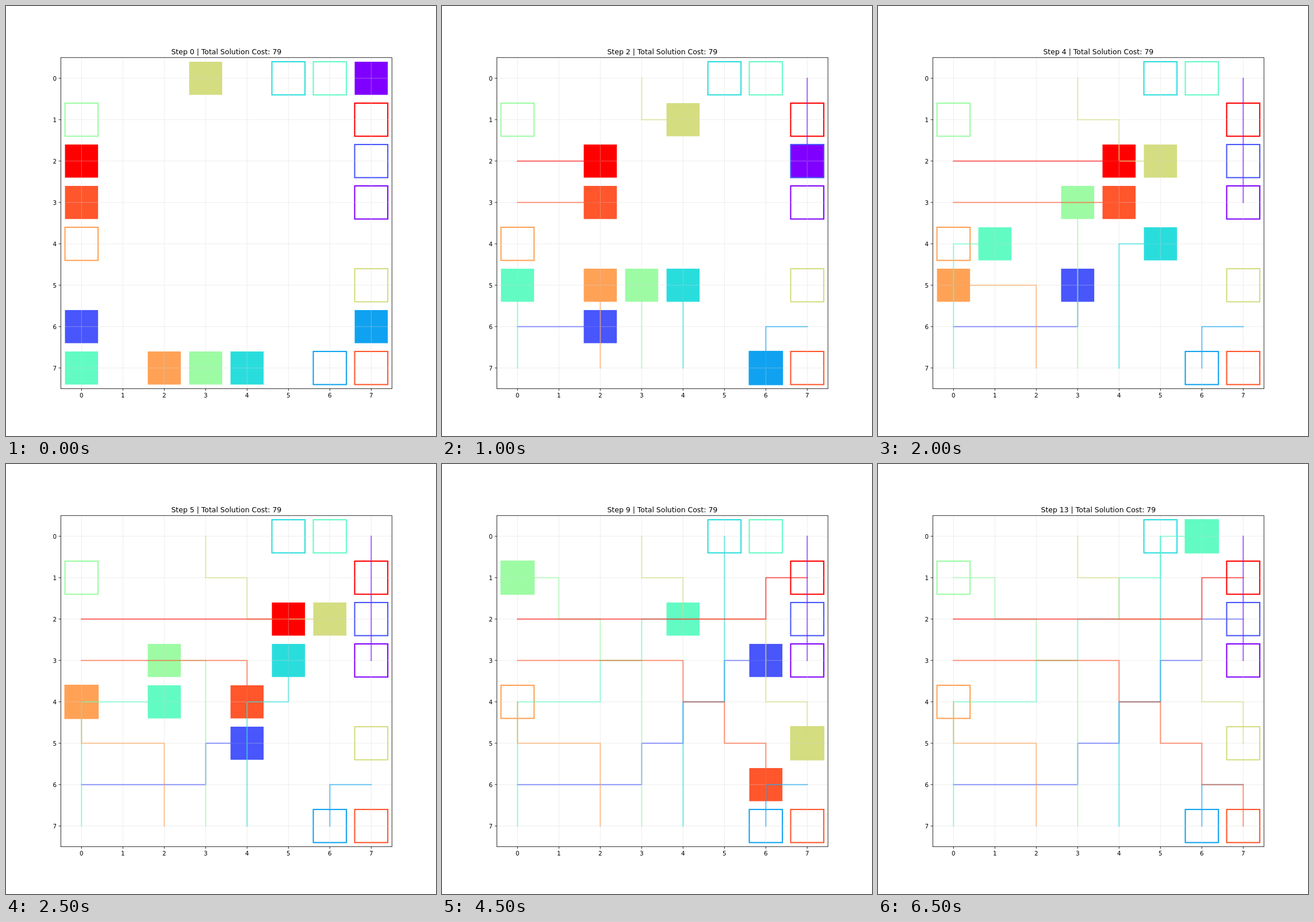
An HTML page with a canvas that plays this animation: 748x748 px, repeating every 7 s.

```html
<!DOCTYPE html>
<html lang="en">
<head>
<meta charset="utf-8">
<title>Grid path plan</title>
<style>
  html, body { margin: 0; width: 100%; height: 100%; overflow: hidden; background: #fff; }
  canvas { display: block; width: 748px; height: 748px; }
</style>
</head>
<body>
<canvas id="stage" width="748" height="748"></canvas>
<script>
const ctx = document.getElementById('stage').getContext('2d');
const SIZE = 748, PT = SIZE / 720, CELLS = 8;
const STEP_MS = 500, STEPS = 14;
const SIDE = 0.77 * SIZE, CELL = SIDE / CELLS;
const MID = 0.5125 * SIZE, LEFT = MID - SIDE / 2, TOP = 0.12 * SIZE;
const RIGHT = LEFT + SIDE, BOTTOM = TOP + SIDE;
const FONT = '"DejaVu Sans", sans-serif';
const MOVES = { U: [0, -1], D: [0, 1], L: [-1, 0], R: [1, 0] };

// Start column, start row, moves
const agents = [
  [7, 0, 'DDD'],
  [0, 6, 'RRRURURURUR'],
  [7, 6, 'LD'],
  [4, 7, 'UUURUUUU'],
  [0, 7, 'UUURRURURURUR'],
  [3, 7, 'UUUULULUL'],
  [3, 0, 'DRDRRDDRD'],
  [2, 7, 'UULLU'],
  [0, 3, 'RRRRDRDRDRD'],
  [0, 2, 'RRRRRRUR']
].map(([col, row, moves], i, all) => {
  const path = [[col, row]];
  for (const m of moves) {
    const [dx, dy] = MOVES[m];
    path.push([col += dx, row += dy]);
  }
  return { path, color: rainbow(i / (all.length - 1)) };
});
const totalCost = agents.reduce((sum, a) => sum + a.path.length - 1, 0);

function rainbow(t) {
  const x = Math.min(255, Math.floor(t * 256)) / 255;
  const rgb = [Math.abs(2 * x - 0.5), Math.sin(Math.PI * x), Math.cos(Math.PI * x / 2)];
  return `rgb(${rgb.map(v => Math.round(255 * Math.min(1, Math.max(0, v))))})`;
}

const px = col => LEFT + (col + 0.5) * CELL;
const py = row => TOP + (row + 0.5) * CELL;
const box = ([col, row]) => [px(col - 0.4), py(row - 0.4), 0.8 * CELL, 0.8 * CELL];

function stroke(points, color, width, alpha = 1, cap = 'butt') {
  ctx.globalAlpha = alpha;
  ctx.strokeStyle = color;
  ctx.lineWidth = width * PT;
  ctx.lineCap = cap;
  ctx.lineJoin = 'round';
  ctx.beginPath();
  points.forEach(([x, y]) => ctx.lineTo(x, y));
  ctx.stroke();
  ctx.globalAlpha = 1;
}

function label(text, x, y, size, align) {
  ctx.font = `${size * PT}px ${FONT}`;
  ctx.textAlign = align;
  ctx.fillStyle = '#000';
  ctx.fillText(text, x, y);
}

function drawBoxes(step) {
  for (const { path, color } of agents) {
    ctx.strokeStyle = ctx.fillStyle = color;
    ctx.lineWidth = 2 * PT;
    ctx.lineJoin = 'miter';
    ctx.strokeRect(...box(path[path.length - 1]));
    if (step < path.length) ctx.fillRect(...box(path[step]));
  }
}

function drawGrid() {
  for (let i = 0; i < CELLS; i++) {
    stroke([[px(i), TOP], [px(i), BOTTOM]], '#d3d3d3', 0.8, 0.5);
    stroke([[LEFT, py(i)], [RIGHT, py(i)]], '#d3d3d3', 0.8, 0.5);
  }
}

function drawTrails(step) {
  for (const { path, color } of agents) {
    const trail = path.slice(0, step + 1).map(([c, r]) => [px(c), py(r)]);
    if (trail.length > 1) stroke(trail, color, 2, 0.6, 'square');
  }
}

function drawAxes(step) {
  const tick = 3.5 * PT;
  for (let i = 0; i < CELLS; i++) {
    stroke([[px(i), BOTTOM], [px(i), BOTTOM + tick]], '#000', 0.8);
    stroke([[LEFT - tick, py(i)], [LEFT, py(i)]], '#000', 0.8);
    label(i, px(i), BOTTOM + 2 * tick + 7.9, 10, 'center');
    label(i, LEFT - 2 * tick, py(i) + 3.9, 10, 'right');
  }
  ctx.lineJoin = 'miter';
  ctx.lineWidth = 0.8 * PT;
  ctx.strokeRect(LEFT, TOP, SIDE, SIDE);
  label(`Step ${step} | Total Solution Cost: ${totalCost}`, MID, TOP - 6 * PT, 12, 'center');
}

function draw(step) {
  ctx.fillStyle = '#fff';
  ctx.fillRect(0, 0, SIZE, SIZE);
  drawBoxes(step);
  drawGrid();
  drawTrails(step);
  drawAxes(step);
}

const start = performance.now();
let shown = -1;
function tick() {
  const elapsed = Math.max(0, performance.now() - start);
  const step = Math.floor(elapsed / STEP_MS) % STEPS;
  if (step !== shown) draw(shown = step);
  requestAnimationFrame(tick);
}
tick();
</script>
</body>
</html>
```
